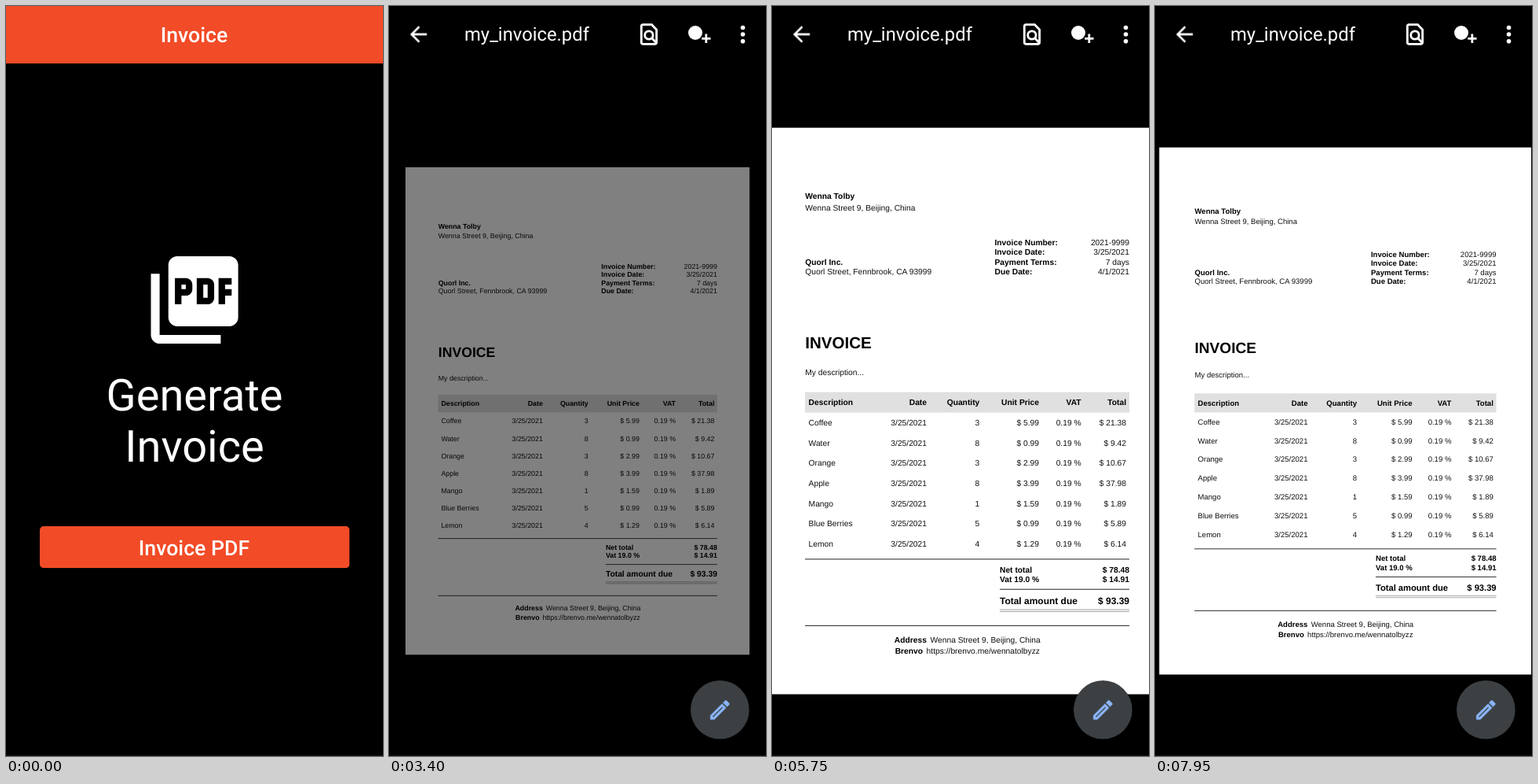
Recreate the animation shown at these times as an HTML page. Size 480x953 px, loop 8000 ms.

```html
<!DOCTYPE html>
<html lang="en">
<head>
<meta charset="utf-8">
<title>Invoice</title>
<style>
  html, body { margin: 0; width: 100%; height: 100%; overflow: hidden; background: #000; }
  svg { display: block; width: 100%; height: 100%; }
  text { text-rendering: geometricPrecision; }
  .ui { font-family: Roboto, sans-serif; fill: #fff; }
  .mid { text-anchor: middle; }
  .med { font-weight: 500; font-size: 26.67px; }
  #page { font: 10.27px "Liberation Sans", Arial, sans-serif; fill: #111; }
  #page .b { font-weight: 700; fill: #000; }
  #page .r { text-anchor: end; }
</style>
</head>
<body>
<svg viewBox="0 0 480 953">
  <defs><clipPath id="btn"><rect x="43" y="661" width="394.5" height="53.3" rx="5"/></clipPath></defs>
  <rect width="480" height="953"/>

  <g id="home" class="ui">
    <rect width="480" height="73" fill="#f24b27"/>
    <text class="mid med" x="239.5" y="46">Invoice</text>
    <path transform="translate(173.4 306.9) scale(5.555)" d="M20 2H8c-1.1 0-2 .9-2 2v12c0 1.1.9 2 2 2h12c1.1 0 2-.9 2-2V4c0-1.1-.9-2-2-2zm-8.5 7.5c0 .83-.67 1.5-1.5 1.5H9v2H7.5V7H10c.83 0 1.5.67 1.5 1.5v1zm5 2c0 .83-.67 1.5-1.5 1.5h-2.5V7H15c.83 0 1.5.67 1.5 1.5v3zm4-3H19v1h1.5V11H19v2h-1.5V7h3v1.5zM9 9.5h1v-1H9v1zM4 6H2v14c0 1.1.9 2 2 2h14v-2H4V6zm10 5.5h1v-3h-1v3z"/>
    <g class="mid" font-size="56">
      <text x="240" y="514">Generate</text>
      <text x="240" y="579.3">Invoice</text>
    </g>
    <g clip-path="url(#btn)">
      <rect x="43" y="661" width="394.5" height="53.3" fill="#f24b27"/>
      <circle id="ripple" cx="240" cy="688"/>
    </g>
    <text class="mid med" x="239.5" y="697.5">Invoice PDF</text>
  </g>

  <g id="page"></g>

  <g id="bar" class="ui">
    <path transform="translate(21.5 20) scale(1.333)" d="M20 11H7.83l5.59-5.59L12 4l-8 8 8 8 1.41-1.41L7.83 13H20v-2z"/>
    <text x="96" y="44" font-size="23.8">my_invoice.pdf</text>
    <g fill="none" stroke="#fff" stroke-width="2.8">
      <path d="M323.5 23.7H334.5L340.6 30V46Q340.6 48.4 338.4 48.4H323.5Q321.3 48.4 321.3 46V26Q321.3 23.7 323.5 23.7Z"/>
      <circle cx="330.9" cy="37" r="5.2"/>
      <path d="M334.4 40.5L340 46.5"/>
      <path d="M403.8 35.5V47M398.2 41.3H409.5"/>
    </g>
    <circle cx="390" cy="34" r="9"/>
    <circle cx="450.5" cy="27.5" r="2.8"/>
    <circle cx="450.5" cy="36" r="2.8"/>
    <circle cx="450.5" cy="44.8" r="2.8"/>
  </g>

  <g id="fab">
    <circle cx="421.3" cy="894.3" r="37.3" fill="#3c4043"/>
    <path transform="translate(405.3 878.4) scale(1.333)" fill="#8ab4f8" stroke="#8ab4f8" stroke-width=".5" stroke-linejoin="round" d="M14.06 9.02l.92.92L5.92 19H5v-.92l9.06-9.06M17.66 3c-.25 0-.51.1-.7.29l-1.83 1.83 3.75 3.75 1.83-1.83c.39-.39.39-1.02 0-1.41l-2.34-2.34c-.2-.2-.45-.29-.71-.29zm-3.6 3.19L3 17.25V21h3.75L17.81 9.94l-3.75-3.75z"/>
  </g>
  <rect y="952" width="480" height="1" fill="#161616"/>
</svg>
<script>
const $ = id => document.getElementById(id);
const home = $('home'), ripple = $('ripple'), page = $('page'), bar = $('bar'), fab = $('fab');

// Invoice sheet, laid out at its resting zoom
const L = 42.3, R = 455, REST = 509, TALL = REST * Math.SQRT2, MID_X = 248.3, MID_Y = 514.6;
const text = (x, y, s, cls = '', size = 10.27) =>
  `<text x="${x}" y="${y}" class="${cls}" font-size="${size}">${s}</text>`;
const line = (x, y, color = '#222', w = 1) =>
  `<path d="M${x} ${y}H${R}" stroke="${color}" stroke-width="${w}"/>`;
const footer = (y, label, s) =>
  `<text class="mid" x="248.8" y="${y}"><tspan class="b">${label}</tspan><tspan dx="4.6">${s}</tspan></text>`;

const columns = [197, 264.3, 340, 393.6, 451];
const row = (y, cells, cls = '') => cells
  .map((s, i) => i ? text(columns[i - 1], y, s, cls + ' r') : text(46.6, y, s, cls)).join('');

const items = [
  ['Coffee', 3, '5.99', '21.38'], ['Water', 8, '0.99', '9.42'], ['Orange', 3, '2.99', '10.67'],
  ['Apple', 8, '3.99', '37.98'], ['Mango', 1, '1.59', '1.89'],
  ['Blue Berries', 5, '0.99', '5.89'], ['Lemon', 4, '1.29', '6.14']
];
const facts = [
  ['Invoice Number:', '2021-9999'], ['Invoice Date:', '3/25/2021'],
  ['Payment Terms:', '7 days'], ['Due Date:', '4/1/2021']
];
const street = 'Wenna Street 9, Beijing, China';

page.innerHTML = [
  `<rect x="${MID_X - REST / 2}" y="${MID_Y - TALL / 2}" width="${REST}" height="${TALL}" fill="#fff"/>`,
  text(L, 245.4, 'Wenna Tolby', 'b'),
  text(L, 259.5, street),
  text(L, 328.7, 'Quorl Inc.', 'b'),
  text(L, 341, 'Quorl Street, Fennbrook, CA 93999'),
  ...facts.map(([k, v], i) => text(283.5, 304.2 + i * 12.25, k, 'b') + text(R, 304.2 + i * 12.25, v, 'r')),
  text(L, 435.4, 'INVOICE', 'b', 20.53),
  text(L, 469.3, 'My description...'),
  `<rect x="42" y="490.6" width="413" height="26" fill="#e0e0e0"/>`,
  row(507.4, ['Description', 'Date', 'Quantity', 'Unit Price', 'VAT', 'Total'], 'b'),
  ...items.map(([name, n, price, sum], i) =>
    row(533 + i * 25.67, [name, '3/25/2021', n, '$ ' + price, '0.19 %', '$ ' + sum])),
  line(42, 702.9),
  text(290, 719.6, 'Net total', 'b'), text(R, 719.6, '$ 78.48', 'b r'),
  text(290, 731.6, 'Vat 19.0 %', 'b'), text(R, 731.6, '$ 14.91', 'b r'),
  line(290, 741.2),
  text(290, 759.6, 'Total amount due', 'b', 11.98), text(R, 759.6, '$ 93.39', 'b r', 11.98),
  line(290, 767, '#999', 0.9), line(290, 769.4, '#999', 0.9),
  line(42, 787.4),
  footer(809, 'Address', street),
  footer(823.4, 'Brenvo', 'https://brenvo.me/wennatolbyzz')
].join('');

// Pinch gesture: time, sheet width, sheet centre
const pinch = [
  [4050, 438, 240], [4300, 465, 245.5], [4650, 511, 248.5], [4900, 514, 248.5],
  [5750, 509, 248.3], [6800, 509, 248.3], [7200, 561, 249], [7500, 533.4, 248.4],
  [7650, 503, 245.7], [7950, 473.6, 242.2]
];
const clamp = x => Math.max(0, Math.min(1, x));
const ramp = (t, a, b) => clamp((t - a) / (b - a));
const ease = x => x * x * (3 - 2 * x);

// Monotone cubic through the pinch keys
function slope(i, k) {
  if (i < 1 || i > pinch.length - 2) return 0;
  const [p, q, r] = pinch.slice(i - 1, i + 2);
  const a = (q[k] - p[k]) / (q[0] - p[0]), b = (r[k] - q[k]) / (r[0] - q[0]);
  return a * b > 0 ? 2 * a * b / (a + b) : 0;
}
function track(t, k) {
  const last = pinch.length - 1;
  if (t <= pinch[0][0]) return pinch[0][k];
  if (t >= pinch[last][0]) return pinch[last][k];
  const i = pinch.findIndex(p => p[0] > t) - 1;
  const p = pinch[i], q = pinch[i + 1], d = q[0] - p[0], u = (t - p[0]) / d;
  return p[k] + (q[k] - p[k]) * ease(u)
    + d * u * (1 - u) * (slope(i, k) * (1 - u) - slope(i + 1, k) * u);
}

const show = (el, on) => el.setAttribute('visibility', on ? 'visible' : 'hidden');

function draw(t) {
  home.setAttribute('opacity', 1 - ramp(t, 950, 1350));
  ripple.setAttribute('r', 210 * ease(ramp(t, 0, 450)));
  ripple.setAttribute('opacity', 0.22 * (1 - ramp(t, 550, 850)) * ramp(t, 0, 100));
  show(fab, t >= 2150);
  show(bar, t >= 2350);
  page.setAttribute('opacity', ease(ramp(t, 3100, 3700)));
  page.setAttribute('transform',
    `translate(${track(t, 2)} ${MID_Y}) scale(${track(t, 1) / REST}) translate(${-MID_X} ${-MID_Y})`);
}

const start = performance.now();
function tick() {
  draw((performance.now() - start) % 8000);
  requestAnimationFrame(tick);
}
tick();
</script>
</body>
</html>
```
